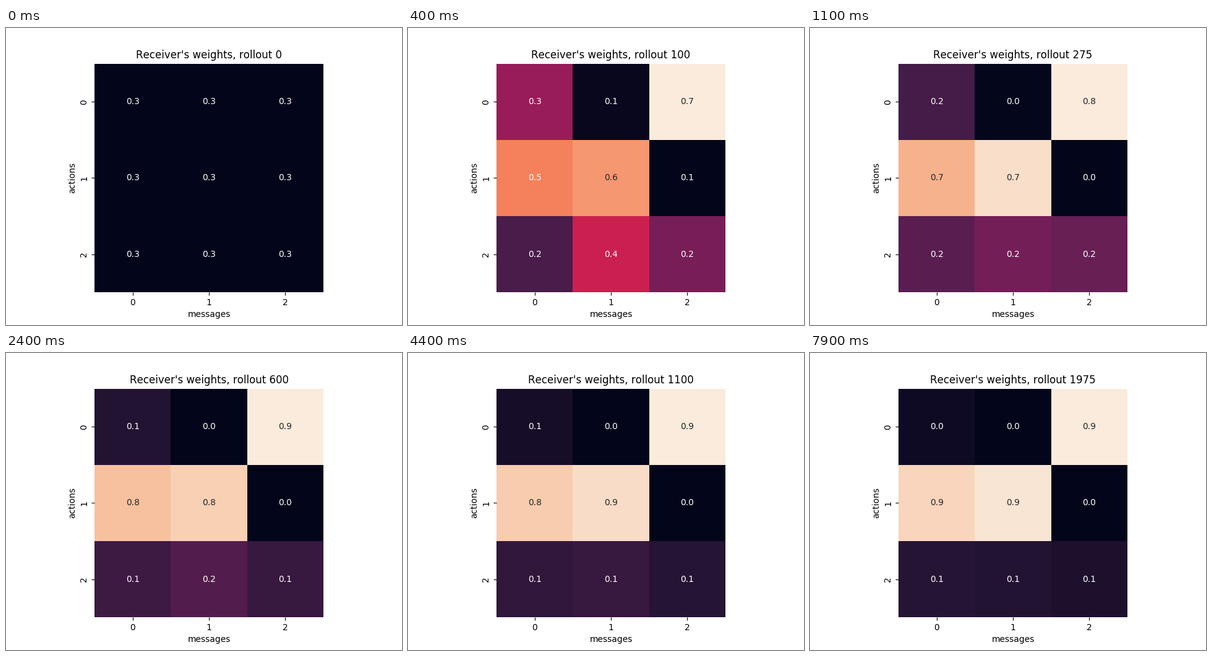
A matplotlib script for the animation above (8 s loop, 640 by 480 pixels).

```python
import numpy as np
import matplotlib.pyplot as plt
from matplotlib.animation import FuncAnimation
from matplotlib.colors import LinearSegmentedColormap

FRAMES, INTERVAL, STEP = 80, 100, 25

# Every count starts at 1; rewarded (action, message) pairs grow between these rollouts.
KEYS = [0, 100, 275, 600, 1975]
GROWTH = {
    (0, 0): (5, 8, 11, 16),
    (1, 0): (9, 34, 96, 404),
    (2, 0): (3, 10, 18, 45),
    (1, 1): (9, 37, 100, 427),
    (2, 1): (6, 12, 24, 42),
    (0, 2): (14, 46, 125, 500),
    (2, 2): (5, 13, 19, 39),
}

RAMP = ("#03051a #221331 #451c47 #691f55 #921c5b #b91657 "
        "#d92847 #ed503e #f47d57 #f6a47c #f7c9aa #faebdd")
cmap = LinearSegmentedColormap.from_list("ramp", RAMP.split())
plt.rcParams["text.kerning_factor"] = 6


def log_time(rollout):
    return np.log1p(np.asarray(rollout) / 50)


def weights(rollout):
    counts = np.ones((3, 3))
    for cell, marks in GROWTH.items():
        log_count = np.interp(log_time(rollout), log_time(KEYS), np.log((1, *marks)))
        counts[cell] = np.rint(np.exp(log_count))
    return counts / counts.sum(axis=0)


def luminance(rgb):
    lin = np.where(rgb <= 0.03928, rgb / 12.92, ((rgb + 0.055) / 1.055) ** 2.4)
    return lin @ [0.2126, 0.7152, 0.0722]


fig, ax = plt.subplots(figsize=(6.4, 4.8), dpi=100)
mesh = ax.pcolormesh(weights(0), cmap=cmap, linewidth=0)
ax.set(xlim=(0, 3), ylim=(3, 0), aspect="equal", xlabel="messages", ylabel="actions")
centers = np.arange(3) + 0.5
ax.set_xticks(centers, range(3))
ax.set_yticks(centers, range(3), rotation="vertical", va="center")
ax.spines[:].set_visible(False)
title = ax.set_title("")
labels = [ax.text(x, y, "", ha="center", va="center") for y in centers for x in centers]


def update(frame):
    rollout = frame * STEP
    w = weights(rollout)
    mesh.set_array(w)
    mesh.set_clim(w.min(), w.max())
    for label, value, rgba in zip(labels, w.flat, mesh.to_rgba(w.ravel())):
        label.set_text(f"{value:.1f}")
        label.set_color(".15" if luminance(rgba[:3]) > 0.408 else "w")
    title.set_text(f"Receiver's weights, rollout {rollout}")
    return [mesh, title, *labels]


anim = FuncAnimation(fig, update, frames=FRAMES, interval=INTERVAL, repeat=True, repeat_delay=0)
plt.show()
```
